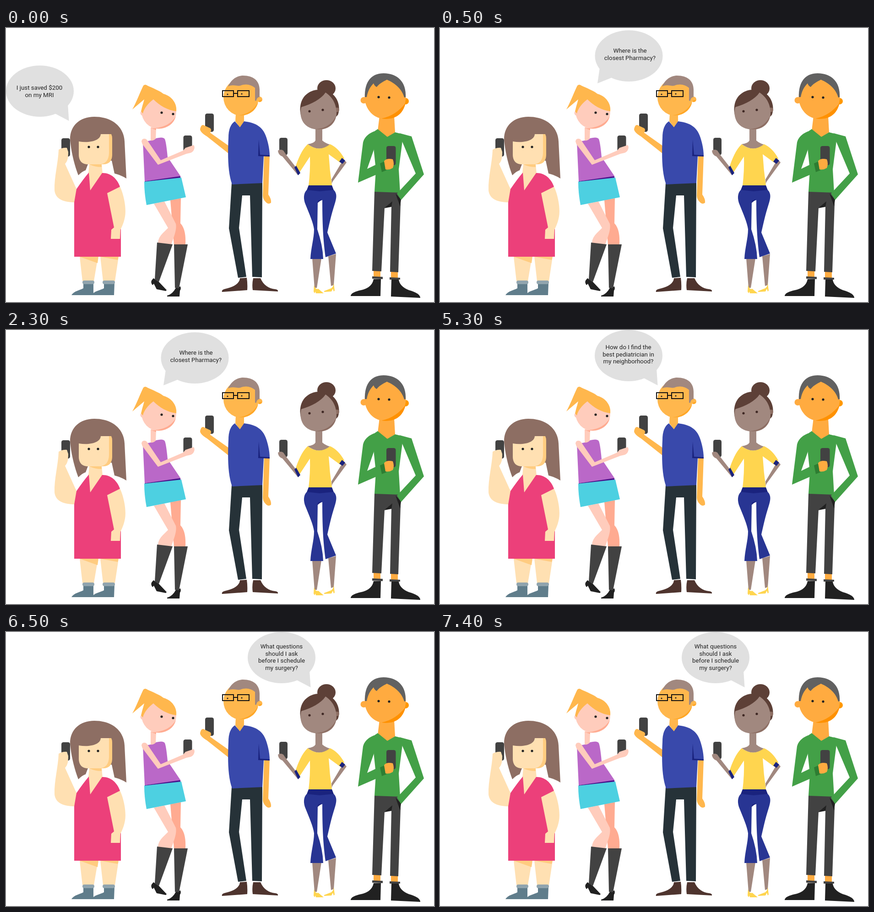
An HTML page for the animation above (8 s loop, 935x599 px).

```html
<!DOCTYPE html>
<html lang="en">
<head>
<meta charset="utf-8">
<title>People asking their phones</title>
<style>
html, body { margin: 0; width: 100%; height: 100%; overflow: hidden; background: #fff; }
svg { display: block; width: 100vw; height: 100vh; }
text { font: 13.33px Roboto, sans-serif; fill: #212121; text-anchor: middle; }
.eyes { stroke: #212121; stroke-width: 5.2px; stroke-linecap: round; }
</style>
</head>
<body>
<svg viewBox="0 0 935 599" preserveAspectRatio="none">
<g id="mother">
  <path fill="#8d6e63" d="M193 194C162 194 140 213 140 243C142 270 149 298 158 322Q167 313 174 311L182 290H231L237 318Q250 321 263 329L259 248C257 213 229 194 193 194Z"/>
  <path fill="#ffcc80" d="M215 232H230Q232 236 232 242V278Q231 298 212 298H195Z"/>
  <path fill="#ffe0b2" d="M159 248C184 252 206 246 207 232H225V274Q224 295 207 298H179C164 298 159 288 159 276Z"/>
  <path fill="#ffe0b2" d="M182 298H209L211 318L184 356L180 317Z"/>
  <path fill="#ffcc80" d="M182 298H209V304Q194 304 182 298Z"/>
  <path fill="#ffe0b2" d="M161 500H201L192 553H167ZM206 500H246L238 553H212Z"/>
  <path fill="#ffcc80" d="M161 500H202L200 514ZM206 500H246L244 507Z"/>
  <path fill="#ec407a" d="M181 316L184 355L210 317C228 316 243 329 249 347L251 440V500H149V385Q149 358 154 352Q169 330 181 316Z"/>
  <path fill="#ffe0b2" d="M221 361L249 347C258 365 263 395 260 412C258 425 252 437 250 441L249 461H229L230 441L236 436Z"/>
  <rect fill="#424242" x="121" y="241" width="19" height="40" rx="4.5"/>
  <path fill="#ffe0b2" d="M115 266Q124 261 133 262L136 271C136 282 135 291 129 297L154 352L149 381C128 381 108 375 106 355C105 326 114 295 115 266Z"/>
  <path fill="#607d8b" d="M169 558H191V584H143C148 575 162 573 169 569ZM214 558H237L236 584H187C192 575 207 573 214 569Z"/>
  <path stroke="#90a4ae" stroke-width="8" stroke-linecap="round" d="M171 556H189M215 556H234"/>
  <path class="eyes" d="M181 260h0M201 260h0"/>
</g>

<g id="girl">
  <path fill="#ffccbc" d="M316 217H328L327 247H316Z"/>
  <ellipse fill="#ffccbc" cx="334" cy="182" rx="38" ry="38.5"/>
  <circle fill="#ffccbc" cx="299" cy="186" r="5.5"/>
  <path fill="#ffab91" d="M371 192C367 212 347 223 322 219C345 218 363 208 371 192ZM317 219L328 220V223Z"/>
  <path fill="#ffb74d" d="M300 126Q304 122 309 126C320 131 337 138 344 144C363 149 374 166 372 182C353 180 335 169 322 156C311 164 301 176 299 187L295 182L302 156L276 178C286 160 293 140 300 126Z"/>
  <path class="eyes" d="M340 185h0M365 188h0"/>
  <path fill="#ffab91" d="M359 376L382 372L381 427C391 437 393 455 392 474H367Z"/>
  <path fill="#ffccbc" d="M323 384L346 379L371 428C374 441 365 461 361 474L332 470C333 454 346 446 354 437Z"/>
  <path fill="#212121" d="M322 547L334 555L351 573L349 575L329 571L323 559L320 562Q316 557 318 552ZM371 568L381 565Q383 571 380 574L379 587H352V585Q364 582 371 568Z"/>
  <path fill="#424242" d="M330 469L364 473L334 555L325 550ZM367 473H397L378 569L369 568Z"/>
  <path fill="#ba68c8" d="M299 249L316 246Q323 247 328 241Q344 237 347 243Q350 250 353 282L382 325L303 335Z"/>
  <path fill="#4a148c" d="M303 335L380 324L382 328L303 337Z"/>
  <path fill="#4dd0e1" d="M302 336L383 327L393 370L307 387Q302 361 302 336Z"/>
  <rect fill="#424242" x="387.5" y="235" width="19" height="36" rx="4.5"/>
  <path fill="#ffccbc" d="M296 248Q297 241 303 242Q306 242 309 246L338 289L387 268L392 262L410 256Q413 259 411 265Q409 271 403 273L394 275L332 299L298 254Z"/>
</g>

<g id="father">
  <path fill="#ffb74d" d="M502 186H520V204L511 218L501 204Z"/>
  <circle fill="#ffb74d" cx="554" cy="156" r="6"/>
  <ellipse fill="#ffb74d" cx="513.5" cy="151.5" rx="38.5" ry="40"/>
  <path fill="#ffa726" d="M551 162C546 181 531 192 508 191C530 188 542 177 551 162ZM553 158L560 157Q557 163 552 161Z"/>
  <path fill="#a1887f" d="M485 128C492 112 505 104 518 104C540 104 554 115 554 135V151Q548 151 547 159H544V131C535 124 525 121 512 126C505 128 495 122 485 128Z"/>
  <path fill="none" stroke="#111" stroke-width="2" d="M473 137H497V150H473ZM506 137H531V150H506ZM497 143H506"/>
  <path class="eyes" style="stroke-width:3.2px" d="M484 145h0M515 144h0"/>
  <path fill="#ffb74d" d="M564 278H576L573 364Q580 374 579 382Q573 387 567 380Q561 374 561 366Z"/>
  <rect fill="#424242" x="435" y="187" width="19" height="40" rx="4.5"/>
  <path fill="#ffb74d" d="M424 221Q426 211 431 212L446 219Q450 222 446 229L487 258V275L439 237Q424 228 424 221Z"/>
  <path fill="#4e342e" d="M511 547L526 546Q528 560 527 573L472 577Q470 572 480 570C495 567 510 560 511 547ZM540 547H556C562 562 575 570 588 571Q595 572 594 576L539 573Q537 560 540 547Z"/>
  <path fill="#263238" d="M493 339L560 337L559 545L538 544L533 366H516L509 437L525 544L507 546L487 438Z"/>
  <path fill="#3949ab" d="M500 204L511 217L520 204C547 207 563 217 570 243Q576 263 576 280H563L560 339L494 342C485 318 484 281 486 240Q486 213 500 204Z"/>
  <path fill="#1a237e" d="M552 244L555 277L576 278V281L551 280Z"/>
</g>

<g id="sister">
  <ellipse fill="#5d4037" cx="700" cy="132" rx="20" ry="18"/>
  <path fill="#5d4037" d="M658 214C640 200 637 165 653 148C669 131 697 131 713 144C726 155 731 174 725 190L700 215Z"/>
  <circle fill="#8d6e63" cx="723" cy="179" r="5"/>
  <path fill="#a1887f" d="M676 216H691V246Q698 252 708 255Q684 273 659 254Q673 252 676 246Z"/>
  <path fill="#a1887f" d="M698 141C688 156 668 166 645 173C639 196 650 222 684 222C708 222 722 205 722 186C722 165 712 150 698 141Z"/>
  <path fill="#8d6e63" d="M721 193C716 213 699 224 675 221C697 220 711 211 721 193Z"/>
  <path class="eyes" style="stroke:#3e2723" d="M663 182h0M692 179h0"/>
  <rect fill="#424242" x="597" y="240" width="18" height="38" rx="4.5"/>
  <path fill="#a1887f" d="M594 268Q600 264 606 268L612 277L633 304L638 322L604 281Q595 278 594 268Z"/>
  <path fill="#a1887f" d="M738 287L744 294L714 335Q711 340 712 345L711 331L733 294Z"/>
  <path fill="#a1887f" d="M669 504H689L679 568H674ZM704 499L721 494L716 562L710 564Z"/>
  <path fill="#ffd54f" d="M673 562Q676 573 682 570L694 580H677L676 576L674 580L672 576ZM716 558L718 574L716 576L714 570L711 576L695 577V575L708 570Q715 568 716 558Z"/>
  <path fill="#ffd54f" d="M659 254Q684 273 708 254Q726 262 739 285L731 295L705 276Q707 311 712 345H661Q665 311 664 281L641 316L633 302C638 287 646 266 659 254Z"/>
  <path fill="#1a237e" d="M630 305L634 301L643 317L638 322ZM734 284L741 290L735 297L728 292ZM661 344H712L717 357H656Z"/>
  <path fill="#283593" d="M657 354L685 357L716 354C724 362 722 372 718 385C710 410 706 430 702 447L721 493L698 501C694 470 691 440 691 376L681 380L680 440Q692 475 693 505H665C666 481 673 460 673 440C671 425 662 405 654 385C650 375 649 362 657 354Z"/>
  <path fill="#1a237e" d="M691 374L680 383L682 377Z"/>
</g>

<g id="brother">
  <path fill="#ffab40" d="M816 192H848L850 228L833 239L812 225Z"/>
  <circle fill="#ffab40" cx="781.5" cy="158" r="7"/>
  <circle fill="#ff9800" cx="873" cy="160" r="7"/>
  <ellipse fill="#ffab40" cx="828.5" cy="151" rx="45" ry="48"/>
  <path fill="#ff9100" d="M873 164C867 189 850 202 820 198C844 193 859 181 873 164Z"/>
  <path fill="#616161" d="M784 151C783 115 800 99 825 99C855 99 875 118 873 151L870 152C866 135 850 120 832 113C822 118 814 123 810 129Q805 127 803 121C794 130 790 140 788 151Z"/>
  <path class="eyes" d="M814 151h0M837 152h0"/>
  <path fill="#ffab40" d="M803 531H818V545H803ZM841 533H856V547H841Z"/>
  <path fill="#424242" d="M800 543L823 544V549L800 548ZM838 545L861 546V550H838Z"/>
  <path fill="#212121" d="M803 549H819L818 586H753C753 578 770 574 780 572Q800 566 803 549ZM842 550H858Q860 565 880 573Q905 580 905 590L841 587Z"/>
  <path fill="#424242" d="M805 358H861L862 385L857 534L839 533L842 390L827 393L820 532L800 531Z"/>
  <path fill="#212121" d="M826 394L844 379L842 391ZM851 362L863 375L861 390Z"/>
  <g fill="#43a047">
    <path d="M812 221L803 227V262L808 310L805 358L861 360L858 309L866 247L862 231L850 228L833 238Z"/>
    <path d="M804 226Q784 234 780 250L769 338L824 314L818 294L789 308L805 262Z"/>
    <path d="M860 230L886 237L913 320L863 376L854 362L895 318L865 247Z"/>
  </g>
  <path fill="#2e7d32" d="M817 296L826 292L831 311L821 315Z"/>
  <rect fill="#424242" x="831" y="258" width="20.5" height="42" rx="4.5"/>
  <path fill="#ffab40" d="M826 291Q831 284 845 287Q849 297 845 306Q837 311 829 309Z"/>
</g>

<g id="bubble" fill="#e0e0e0"></g>
</svg>
<script>
const LOOP = 8000;
// side: which way the tail points; tx, ty: first line of text
const lines = [
  { at: 0, cx: 74, cy: 138, side: 1, tx: 73, ty: 135,
    text: ["I just saved $200", "on my MRI"] },
  { at: 500, cx: 412.5, cy: 61, side: -1, tx: 415, ty: 54,
    text: ["Where is the", "closest Pharmacy?"] },
  { at: 3500, cx: 412, cy: 56, side: 1, tx: 411.5, ty: 42,
    text: ["How do I find the", "best pediatrician in", "my neighborhood?"] },
  { at: 6500, cx: 602, cy: 56, side: 1, tx: 602, ty: 36,
    text: ["What questions", "should I ask", "before I schedule", "my surgery?"] }
];
const bubble = document.getElementById("bubble");

function speech({ cx, cy, side, tx, ty, text }) {
  const tail = side > 0
    ? `M${cx + 33} ${cy + 49}L${cx + 63.5} ${cy + 65}L${cx + 61} ${cy + 28}Z`
    : `M${cx - 36} ${cy + 47}L${cx - 68.5} ${cy + 60}L${cx - 63.5} ${cy + 26}Z`;
  const rows = text.map((row, i) =>
    `<text x="${tx}" y="${Math.round(ty + i * 15.7)}">${row}</text>`).join("");
  return `<ellipse cx="${cx}" cy="${cy}" rx="74" ry="56"/><path d="${tail}"/>${rows}`;
}

let shown = null;
function draw(ms) {
  const line = lines.filter(l => l.at <= ms).pop();
  if (line === shown) return;
  shown = line;
  bubble.innerHTML = speech(line);
}

const start = performance.now();
function tick() {
  draw((performance.now() - start) % LOOP);
  requestAnimationFrame(tick);
}
tick();
</script>
</body>
</html>
```
